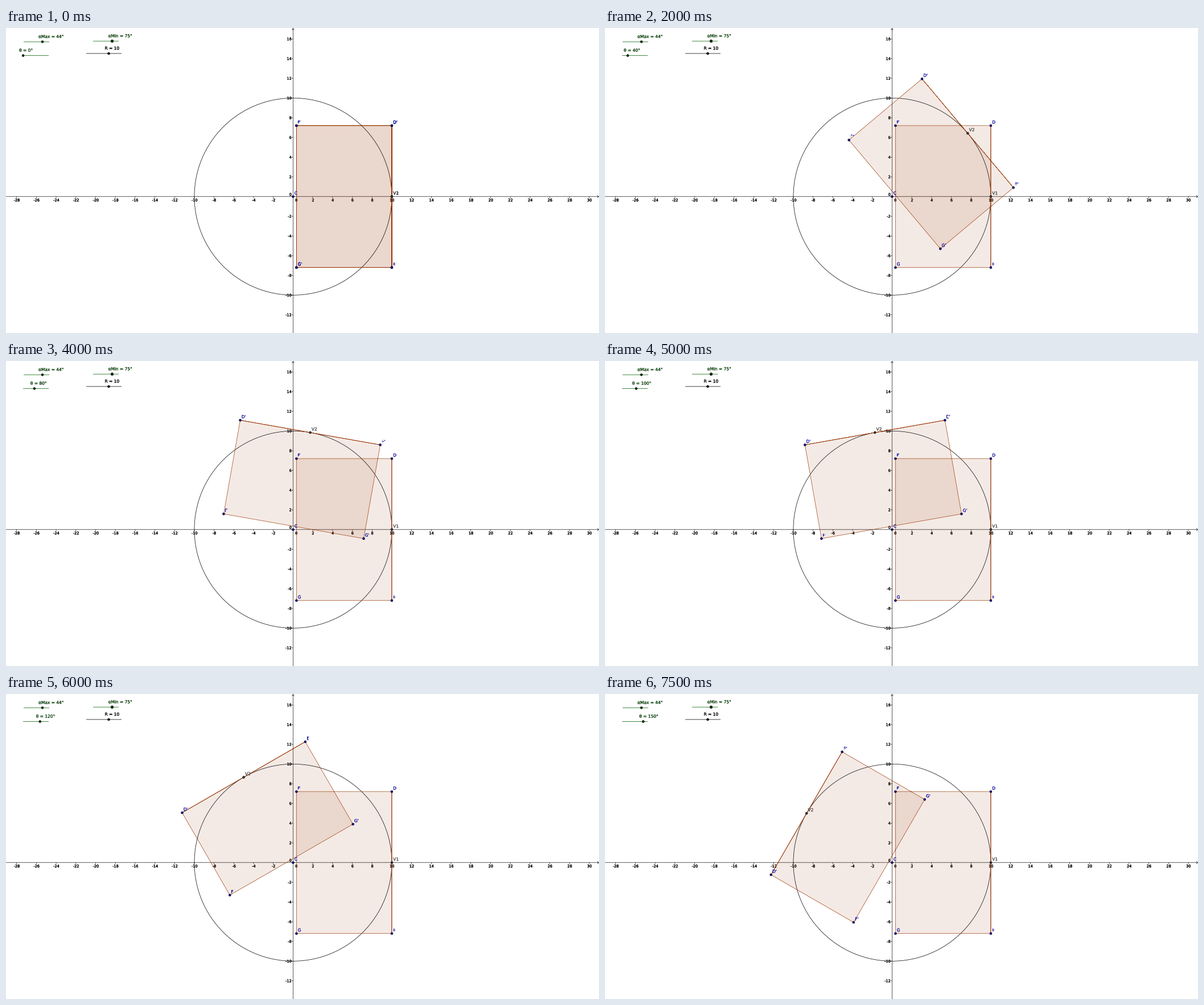
Write a matplotlib script that moves like this. It is 1042x537 px and loops after 8000 ms.

```python
import numpy as np
import matplotlib.pyplot as plt
from matplotlib.animation import FuncAnimation
from matplotlib.patches import Circle, Polygon
from matplotlib.patheffects import withStroke

W, H, DPI = 1042, 537, 100
OX, OY, UNIT = 504.45, 296.8, 17.35
FRAMES, STEP_MS, STEP_DEG = 16, 500, 10
PT = 72 / DPI
THIN = 0.65
BROWN = (0.6, 0.2, 0)
GREEN, GREEN_TEXT = "#006400", "#0c400c"
BLUE, BLUE_TEXT = "#1212a4", "#1010a0"
GRAY, GRAY_TEXT = "#404040", "#505050"
BLACK = "#000000"

# Thin lines and small text keep their subpixel positions.
plt.rcParams.update({"font.family": "DejaVu Sans", "path.snap": False})
fig = plt.figure(figsize=(W / DPI, H / DPI), dpi=DPI, facecolor="white")
ax = fig.add_axes([0, 0, 1, 1])
ax.set_xlim(0, W)
ax.set_ylim(H, 0)
ax.axis("off")


def to_px(p):
    return np.array([OX, OY]) + np.asarray(p) * [UNIT, -UNIT]


def line(xs, ys, color=BLACK, width=THIN, z=1):
    return ax.plot(xs, ys, color=color, lw=width * PT, zorder=z,
                   solid_capstyle="butt")[0]


def text(x, y, s, size=7.45, color=BLACK, ha="left", z=6, weight=0.12):
    effect = withStroke(linewidth=weight * PT, foreground=color)
    return ax.text(x, y, s, fontsize=size * PT, color=color, ha=ha,
                   va="baseline", zorder=z, path_effects=[effect])


def number(x, y, v, ha):
    text(x, y, str(v), 6.5, ha=ha, z=2, weight=0.25)


def dot(center, color, r=1.9, z=5):
    patch = Circle(center, r, fc=color, ec="black", lw=THIN * PT, zorder=z)
    return ax.add_patch(patch)


def draw_axes():
    line([0, W], [OY, OY])
    line([OX, OX], [0, H])
    line([W - 3, W - 0.5, W - 3], [OY - 2, OY, OY + 2])
    line([OX - 2, OX, OX + 2], [3.5, 1, 3.5])
    for v in range(-28, 31, 2):
        x = OX + v * UNIT
        line([x, x], [OY, OY + 2.5])
        number(x + 0.3 if v else x + 5.7, 305.3, v, "center")
    for v in range(-12, 17, 2):
        y = OY - v * UNIT
        line([OX - 2.5, OX], [y, y])
        number(OX - 2.7, y + (2.4 if v else -1.5), v, "right")


def slider(x0, x1, y, x, label, color, ink):
    line([x0, x1], [y, y], color, 0.75)
    knob = dot((x, y), color if color == BLACK else "#0a300a")
    return knob, text(x - 7, y - 6.7, label, color=ink)


class Mark:
    """Point with a label beside it."""

    def __init__(self, label, pos, color=BLUE, ink=BLUE_TEXT):
        self.dot = dot((0, 0), color)
        self.label = text(0, 0, label, color=ink)
        self.move(pos)

    def move(self, pos):
        x, y = to_px(pos)
        self.dot.center = x, y
        self.label.set_position((x + 2.3, y - 3.5))


def fill(points):
    return ax.add_patch(Polygon(to_px(points), fc=BROWN + (0.1,), ec="none",
                                zorder=2))


R, HALF = 10, 7.2
NEAR = R - R * np.tan(np.radians(44))
corners = np.array([(R, HALF), (R, -HALF), (NEAR, -HALF), (NEAR, HALF)])
names = "DEGF"
GAP = [[np.nan, np.nan]]


def outline(*shapes):
    """Closed outlines as one stroke, so that overlaps do not darken."""
    parts = [np.vstack([s, s[:2], GAP]) for s in shapes]
    return to_px(np.vstack(parts)).T


draw_axes()
ax.add_patch(Circle((OX, OY), R * UNIT, fill=False, ec=BLACK,
                    lw=0.72 * PT, zorder=3))

slider(31, 76, 24.2, 64, "αMax = 44°", GREEN, GREEN_TEXT)
ax.add_patch(Circle((186.5, 23.1), 3.1, fc="#8f9a8f", ec="none", zorder=4))
slider(153, 198, 23.1, 186.5, "αMin = 75°", GREEN, GREEN_TEXT)
slider(141, 203, 44.9, 180.5, "R = 10", BLACK, BLACK)
knob, theta_label = slider(30, 75, 48.5, 30.1, "θ = 0°", GREEN, GREEN_TEXT)

fill(corners)
turned = fill(corners)
edges = line(*outline(corners, corners), BROWN, THIN, 4)
Mark("C", (0, 0))
Mark("V1", (R, 0), GRAY, GRAY_TEXT)
fixed = [Mark(n, p) for n, p in zip(names, corners)]
moving = [Mark(n + "'", p) for n, p in zip(names, corners)]
v2 = Mark("V2", (R, 0), GRAY, GRAY_TEXT)


def update(i):
    deg = i * STEP_DEG
    c, s = np.cos(np.radians(deg)), np.sin(np.radians(deg))
    points = corners @ np.array([[c, s], [-s, c]])
    turned.set_xy(to_px(points))
    edges.set_data(*outline(corners, points))
    for mark, p in zip(moving, points):
        mark.move(p)
    v2.move((R * c, R * s))
    x = 30.1 + deg * 0.2472
    knob.center = x, 48.5
    theta_label.set_x(x - 7)
    theta_label.set_text(f"θ = {deg}°")
    return []


anim = FuncAnimation(fig, update, frames=FRAMES, interval=STEP_MS,
                     repeat=True, repeat_delay=0, blit=False)
plt.show()
```
